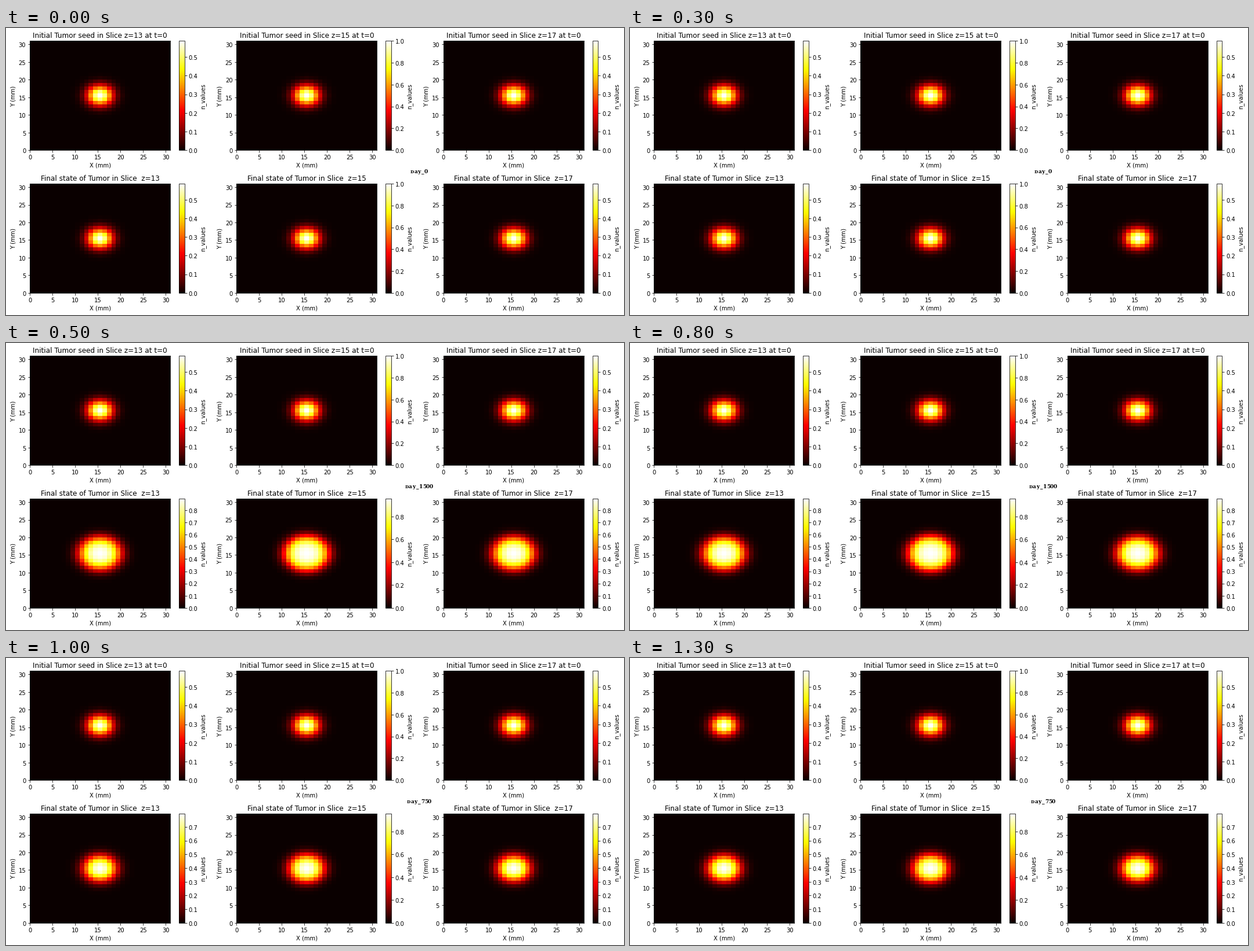
A matplotlib script that plays this animation: 1065 px wide and 496 px high, repeating every 1500 ms.

```python
import numpy as np
import matplotlib.pyplot as plt
from matplotlib.animation import FuncAnimation
from matplotlib.transforms import Affine2D

W, H, DPI = 1065, 496, 72
N, MID = 31, 15            # grid cells per side, centre cell
SLICES = (13, 15, 17)
DAYS = (0, 1500, 750)      # shown in this order
# Highest density in the outer and the middle slices on each day
PEAKS = {0: (0.5866, 1.0), 750: (0.797, 0.957), 1500: (0.895, 0.956)}
GROWTH, SPREAD = 2.6 / 1500, 0.16

# Layout in pixels; all text sits DROP lower than its axes
LEFT, PITCH_X, TOPS = 41.15, 356.28, (22.4, 269.0)
AX_W, AX_H = 241.8, 188.8
DROP = 0.8
MID_Y = 0.5 - DROP / AX_H


def seed():
    k = np.arange(N) - MID
    g = np.exp(-k**2 / 7.5)
    return g[:, None, None] * g[None, :, None] * g[None, None, :]


def grow(days, step=25):
    """Logistic growth with diffusion from the seed."""
    u = seed()
    dt = GROWTH * step
    for _ in range(days // step):
        lap = sum(np.roll(u, s, a) for a in range(3) for s in (1, -1)) - 6 * u
        u = u + dt * (SPREAD * lap + u * (1 - u))
    return u


def slices(day):
    u = grow(day)
    out = []
    for z in SLICES:
        peak = PEAKS[day][z == MID]
        out.append((u[z] * peak / u[z].max(), peak))
    return out


def lowered(parts):
    trans, va, ha = parts
    return trans + Affine2D().translate(0, -DROP), va, ha


class LowTextAxes(plt.Axes):
    """Axes whose tick labels are lowered by DROP."""

    def get_xaxis_text1_transform(self, pad):
        return lowered(super().get_xaxis_text1_transform(pad))

    def get_yaxis_text1_transform(self, pad):
        return lowered(super().get_yaxis_text1_transform(pad))

    def get_yaxis_text2_transform(self, pad):
        return lowered(super().get_yaxis_text2_transform(pad))


def add_axes(x, y, w):
    rect = [x / W, 1 - (y + AX_H) / H, w / W, AX_H / H]
    return fig.add_axes(rect, axes_class=LowTextAxes)


def panel(col, row, title, values, peak):
    x, y = LEFT + PITCH_X * col, TOPS[row]
    ax = add_axes(x, y, AX_W)
    image = ax.imshow(values, cmap="hot", vmin=0, vmax=peak, origin="lower",
                      extent=(0, N, 0, N), aspect="auto",
                      interpolation="nearest")
    ax.set_xlabel("X (mm)")
    ax.set_ylabel("Y (mm)", y=MID_Y)
    ax.set_title(title, pad=6 - DROP)
    cax = add_axes(x + AX_W * 1.0625, y, AX_H / 20)
    fig.colorbar(image, cax=cax).set_label("n_values", y=MID_Y)
    return image


plt.rcParams.update({"font.family": "DejaVu Sans", "font.size": 10})
fig = plt.figure(figsize=(W / DPI, H / DPI), dpi=DPI, facecolor="white")
states = [slices(day) for day in DAYS]

images = []
for i, z in enumerate(SLICES):
    panel(i, 0, f"Initial Tumor seed in Slice z={z} at t=0", *states[0][i])
    images.append(panel(i, 1, f"Final state of Tumor in Slice  z={z}",
                        *states[0][i]))

# Day label, set on a fixed pitch of 6 px per character
PITCH, LABEL_X, BASE_Y = 6, 712, 251
chars = [fig.text(0, 1 - BASE_Y / H, "", family="DejaVu Serif",
                  weight="bold", size=9, ha="center", va="baseline")
         for _ in range(8)]
chars[0].set_size(7)


def draw(frame):
    for image, (values, peak) in zip(images, states[frame]):
        image.set_data(values)
        image.set_clim(0, peak)
    label = f"Day_{DAYS[frame]}"
    left = LABEL_X - PITCH * len(label) / 2
    for i, char in enumerate(chars):
        char.set_text(label[i] if i < len(label) else "")
        char.set_x((left + PITCH * (i + 0.5)) / W)
    return images + chars


anim = FuncAnimation(fig, draw, frames=len(DAYS), interval=500,
                     init_func=lambda: draw(0), repeat=True, repeat_delay=0,
                     blit=False)
plt.show()
```
